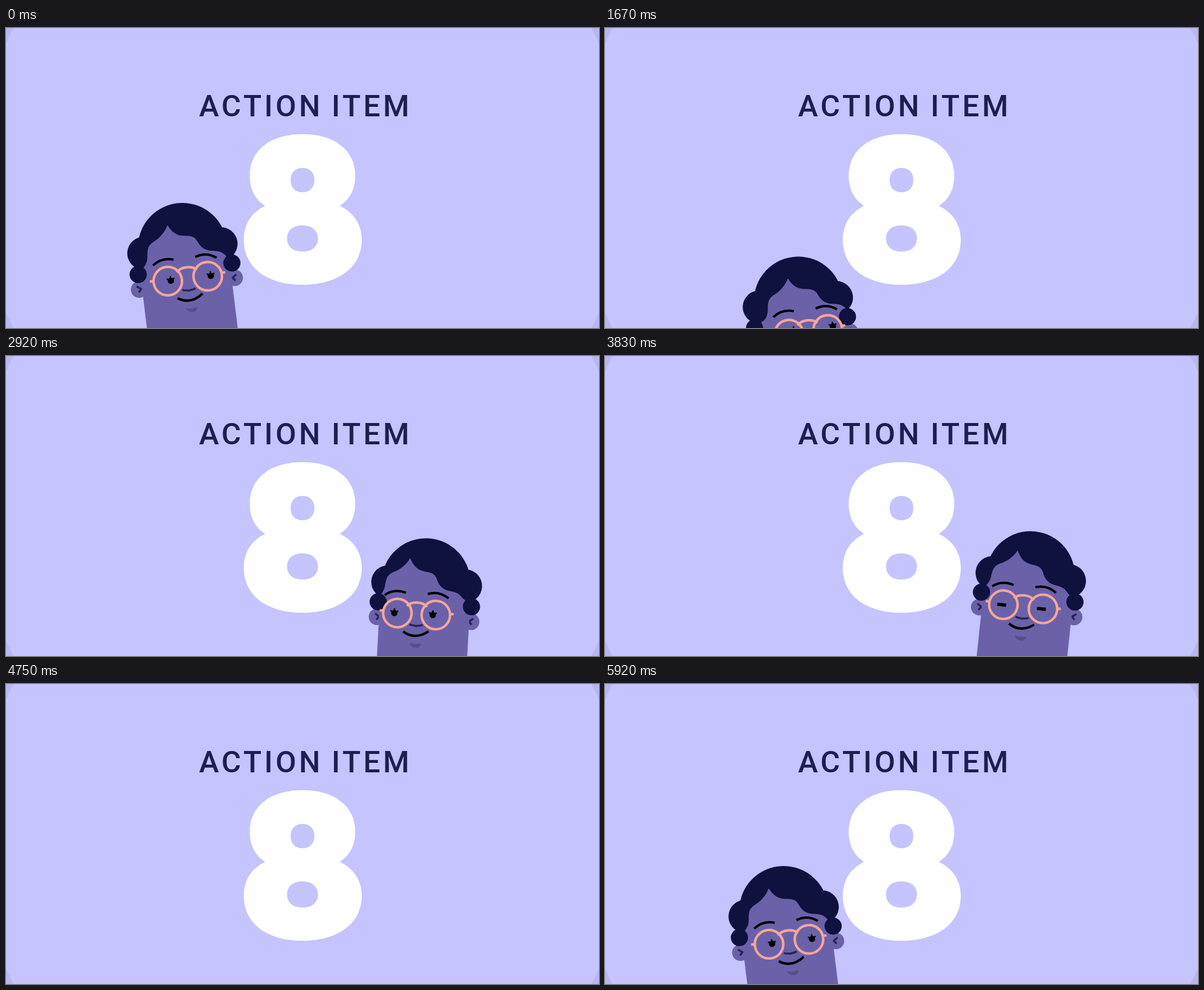
An HTML page with a canvas for the animation above (6010 ms loop, 1000x506 px).

```html
<!DOCTYPE html>
<html lang="en">
<head>
<meta charset="utf-8">
<title>Action item</title>
<style>
  html, body { margin: 0; width: 100%; height: 100%; overflow: hidden; background: #c5c4ff; }
  canvas { display: block; width: 100vw; height: 100vh; }
</style>
</head>
<body>
<canvas id="stage" width="1000" height="506"></canvas>
<script>
const ctx = document.getElementById('stage').getContext('2d');
const LOOP = 6010, STEP = 1000 / 12, LAST = 71;
const INK = '#1e1e50', HAIR = '#0f113f', SKIN = '#6b61a9', SHADE = '#574d8d',
      LINE = '#2a2456', FRAME = '#f6a699';

const EIGHT = new Path2D(
  'M500 179C554 179 589 206 589 249C589 272 580 289 563 300' +
  'C586 311 600 331 600 357C600 404 560 433 500 433' +
  'C440 433 401 404 401 357C401 331 414 311 437 300' +
  'C420 289 411 272 411 249C411 206 446 179 500 179Z' +
  'M500 236C513 236 520 244 520 256.5C520 269 513 277 500 277' +
  'C487 277 480 269 480 256.5C480 244 487 236 500 236Z' +
  'M500 333C516 333 526 341 526 355C526 369 516 377 500 377' +
  'C484 377 474 369 474 355C474 341 484 333 500 333Z');
const CHIN = new Path2D('M-9.5 103Q1 105 11.5 103Q8 111 1 110.5Q-6 110-9.5 103Z');
const NOSE = new Path2D('M-11 71C-7 74-4 72 0 73.8C4 72 7 74 11 71');

function ease(a, b, n) {
  const u = Math.min(1, Math.max(0, (n - a) / (b - a)));
  return u * u * (3 - 2 * u);
}
const mix = (a, b, u) => a + (b - a) * u;

function disc(x, y, r, color) {
  ctx.fillStyle = color;
  ctx.beginPath();
  ctx.arc(x, y, r, 0, 7);
  ctx.fill();
}

function stroke(path, color, width) {
  ctx.strokeStyle = color;
  ctx.lineWidth = width;
  ctx.stroke(typeof path === 'string' ? new Path2D(path) : path);
}

function at(x, y, draw, flip = 1) {
  ctx.save();
  ctx.translate(x, y);
  ctx.scale(flip, 1);
  draw();
  ctx.restore();
}

function drawBackdrop() {
  ctx.fillStyle = '#b9b7f1';
  ctx.fillRect(0, 0, 1000, 506);
  disc(500, 253, 549, '#c5c4ff');
  ctx.fillStyle = INK;
  ctx.font = '500 50.6px Roboto, sans-serif';
  ctx.letterSpacing = '4.6px';
  ctx.wordSpacing = '-2.6px';
  ctx.fillText('ACTION ITEM', 325.5, 149);
  ctx.fillStyle = '#fff';
  ctx.fill(EIGHT, 'evenodd');
}

function drawSkin(shift) {
  const x = v => v + shift;
  ctx.fillStyle = SKIN;
  ctx.beginPath();
  ctx.moveTo(x(-71), 25);
  ctx.quadraticCurveTo(x(-63), 18, x(-62.5), 5);
  ctx.bezierCurveTo(x(-61), -4, x(-60), -10, x(-50), -15);
  ctx.bezierCurveTo(x(-38), -20, x(-28), -30, x(-23), -40);
  ctx.bezierCurveTo(x(-18), -31, x(-13), -22, x(0), -19.5);
  ctx.bezierCurveTo(x(8), -17.5, x(18), -19, x(23), -9);
  ctx.bezierCurveTo(x(27), 1, x(32), 9, x(45), 11.5);
  ctx.bezierCurveTo(x(55), 13, x(62), 14, x(68), 22);
  ctx.lineTo(76, 32);
  ctx.lineTo(76, 230);
  ctx.lineTo(-76, 230);
  ctx.lineTo(-76, 34);
  ctx.fill();
}

function drawEye(x, y, closed) {
  at(x, y, () => {
    if (closed) {
      ctx.fillStyle = '#000';
      ctx.fillRect(-7.5, -2.7, 15, 5.4);
      return;
    }
    disc(0, 0, 5.3, '#000');
    stroke('M-6.5-4L0 0L6.5-4M0 0V-8', '#000', 2.2);
  });
}

function drawFace(p) {
  const half = 34 - 0.009 * p.turn * p.turn;
  for (const side of [-1, 1]) {
    at(-1.5, -2.5 * p.mood, () => stroke('M18.5 18.7Q37.5 12 54 24.3', '#000', 4), side);
    drawEye(side * half + p.gazeX, 53.5 + p.gazeY, p.closed);
  }
  stroke(NOSE, LINE, 3.4);
  const w = mix(21.3, 15.8, p.mood), mx = mix(0.3, 1.2, p.mood), my = p.mood;
  stroke(`M${mx - w} ${84 + my}Q${mx - 1} ${98 + my} ${mx + w} ${81.5 + 2 * my}`, '#000', 4);
  ctx.fillStyle = SHADE;
  ctx.fill(CHIN);
  for (const side of [-1, 1]) {
    at(side * half, 53.5, () => {
      ctx.strokeStyle = FRAME;
      ctx.lineWidth = 4.2;
      ctx.beginPath();
      ctx.arc(0, 0, 24, 0, 7);
      ctx.moveTo(24, -3);
      ctx.lineTo(30, -3);
      ctx.stroke();
    }, side);
  }
  stroke('M-17 40.5C-9 32 9 32 17 40.5', FRAME, 4.2);
}

function drawHead(p) {
  ctx.save();
  ctx.translate(p.x, p.y);
  ctx.rotate(p.tilt * Math.PI / 180);
  const tuck = 0.16 * Math.abs(p.turn);
  for (const side of [-1, 1]) {
    at(side * (81.5 - tuck), 61.7, () => {
      disc(0, 0, 14, SKIN);
      stroke('M3.5-5.5L-3.5-.5L1 4.8', LINE, 3.4);
    }, side);
    disc(side * 65.5 - 0.1 * p.turn, 2, 28, HAIR);
  }
  disc(0, 0, 75, HAIR);
  drawSkin(p.turn * (p.turn > 0 ? 0.95 : 0.45));
  for (const side of [-1, 1]) disc(side * (79.8 - tuck / 2), 36.3, 14.5, HAIR);
  at(p.turn, 0, () => drawFace(p));
  ctx.restore();
}

// Distance of the head below its resting place; k counts steps from arrival.
function drop(k) {
  if (k < -4) return 999;
  if (k < 0) return 7.1 * (0.3 - k) ** 2;
  return 3.1 * Math.max(0, k - 16.92) ** 3;
}

function leftPose(k, d) {
  const look = ease(9, 13, k);
  return {
    x: 297.5 + 0.315 * d, y: 370 + d, tilt: -7,
    turn: mix(2.5, 10.5, ease(0, 8, k)),
    gazeX: mix(5.2, 9, look), gazeY: mix(0, -4, look),
    mood: ease(8, 14, k)
  };
}

function rightPose(k, d) {
  const settle = ease(-1, 3, k), turned = ease(3, 11, k);
  return {
    x: 717.5 - 7.5 * (1 - settle) - 0.15 * d, y: 370.5 + d, tilt: 3 + 3 * settle,
    turn: mix(-13, -6.5, turned),
    gazeX: mix(-5.2, -2.6, turned), gazeY: 0.3,
    mood: 0
  };
}

function render(t) {
  const n = Math.min(LAST, Math.floor((t + 5) / STEP));
  const k = (n + 10) % 36 - 10;
  const d = drop(k);
  drawBackdrop();
  if (d > 210.9) return;
  const pose = n >= 26 && n < 62 ? rightPose(k, d) : leftPose(k, d);
  pose.closed = k === 9 || k === 10;
  drawHead(pose);
}

const start = performance.now();
function tick() {
  render((performance.now() - start) % LOOP);
  requestAnimationFrame(tick);
}
tick();
</script>
</body>
</html>
```
